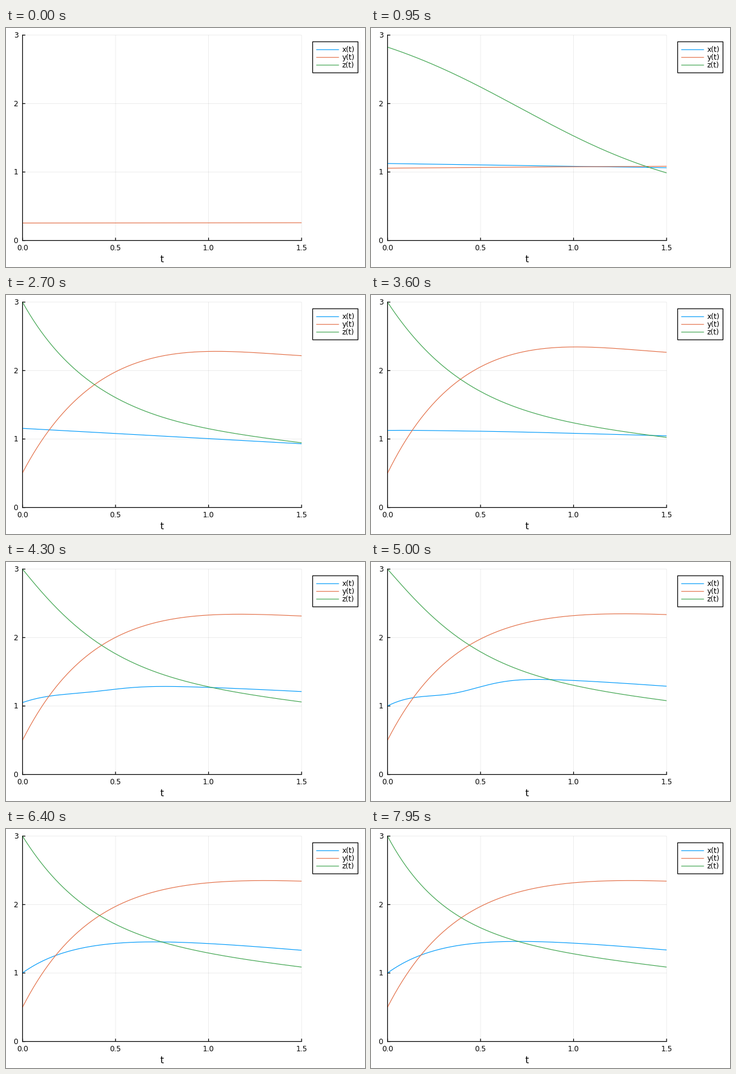
A matplotlib script for the animation above (8 s loop, 600 px wide and 400 px high).

```python
import numpy as np
import matplotlib.pyplot as plt
from matplotlib.animation import FuncAnimation
from matplotlib.patches import Rectangle

W, H, DPI = 600, 400, 100
LEFT, RIGHT, TOP, BOTTOM = 27.6, 494, 11.9, 355.6
FRAMES, INTERVAL = 160, 50
PX = 72 / DPI  # points per pixel
BLACK = "black"

plt.rcParams["font.family"] = "DejaVu Sans"
T = np.linspace(0, 1.5, 151)


# --- building blocks -------------------------------------------------------

def ease(s, a, b):
    u = np.clip((s - a) / (b - a), 0, 1)
    return u * u * (3 - 2 * u)


def fade(s, start, tau):
    """One until start, then a soft decay to zero."""
    return np.exp(-(max(s - start, 0) / tau) ** 1.3)


def bump(u, centre, width):
    return np.exp(-((u - centre) / width) ** 2)


def mix(a, b, w):
    return a + (b - a) * w


def relax(start, level, drift, rate):
    """Exponential approach from start to a drifting level."""
    return level + drift * T + (start - level) * np.exp(-rate * T)


def growth(s, first):
    return 1 - (1 - first) * np.exp(-s / 2.5)


# --- the three curves at training step s -----------------------------------

def x_curve(s):
    tilt = bump(s, 50, 20)
    line = 1.122 - 0.03 * T + (0.035 - 0.125 * T) * tilt
    solved = relax(1.0, 1.719, -0.25, 3.1)
    dip = 0.155 * bump(s, 100, 14) * bump(T, 0.34, 0.24)
    return growth(s, -0.15) * mix(solved, line, fade(s, 70, 20)) - dip


def y_curve(s):
    flat = growth(s, 0.24) * (1.061 + 0.012 * T)
    half = 0.871 + 0.836 * np.tanh((T - 0.25) / 0.65)
    bend = 0.085 * np.sin(2.8 * T) * fade(s, 72, 14)
    solved = relax(0.5, 2.712, -0.212, 2.5) + bend
    return mix(flat, mix(solved, half, fade(s, 36, 9)), ease(s, 18, 36))


def z_curve(s):
    slide = 1.932 - 1.395 * np.tanh((T - 0.72) / 0.95)
    early = growth(s, -0.15) * mix(1.2, slide, ease(s, 1, 18))
    tail = 0.24 * fade(s, 36, 30) * (1 - bump(T, 0, 0.6))
    lag = 2.1 * bump(s, 98, 31) * T * np.exp(-4 * T)
    solved = relax(3.0, 1.5235, -0.298, 3.3)
    return mix(early, solved - tail + lag, ease(s, 18, 36))


SERIES = [
    ("x(t)", "#009afa", x_curve),
    ("y(t)", "#e36f47", y_curve),
    ("z(t)", "#3ea44e", z_curve),
]

# --- fixed parts, in pixels from the top left ------------------------------

fig = plt.figure(figsize=(W / DPI, H / DPI), dpi=DPI, facecolor="white")
page = fig.add_axes([0, 0, 1, 1])
page.set(xlim=(0, W), ylim=(H, 0))
page.axis("off")


def rule(x0, y0, x1, y1, color=BLACK, width=1.25, alpha=1):
    page.plot([x0, x1], [y0, y1], color=color, alpha=alpha, linewidth=width * PX,
              solid_capstyle="butt", snap=False)


def label(x, y, text, ha="center", size=8.7):
    page.text(x, y, text, ha=ha, va="center", fontsize=size, color=BLACK)


def px(t):
    return LEFT + (RIGHT - LEFT) * t / 1.5


def py(v):
    return BOTTOM - (BOTTOM - TOP) * v / 3


for k in range(4):
    x, y = px(k / 2), py(k)
    rule(x, TOP, x, BOTTOM, width=0.7, alpha=0.1)
    rule(LEFT, y, RIGHT, y, width=0.7, alpha=0.1)
    rule(x, BOTTOM, x, BOTTOM - 4.7)
    rule(LEFT, y, LEFT + 4.7, y)
    label(x, 368, f"{k / 2:.1f}")
    label(20.3, y + 0.6, str(k), ha="right")
rule(LEFT, TOP - 0.6, LEFT, BOTTOM + 0.6)
rule(LEFT - 0.6, BOTTOM, RIGHT + 0.6, BOTTOM)
label(261, 387, "t", size=11.2)

page.add_patch(Rectangle((512.5, 23), 75.8, 52, facecolor="white", edgecolor=BLACK,
                         linewidth=1.25 * PX, snap=False))

# --- moving curves ---------------------------------------------------------

ax = fig.add_axes([LEFT / W, 1 - BOTTOM / H, (RIGHT - LEFT) / W, (BOTTOM - TOP) / H])
ax.set(xlim=(0, 1.5), ylim=(0, 3))
ax.axis("off")

lines = []
for i, (name, color, curve) in enumerate(SERIES):
    y = 36.3 + 12.9 * i
    rule(518.5, y, 556.5, y, color=color, width=1.15)
    label(562, y + 0.5, name, ha="left")
    lines += ax.plot([], [], color=color, linewidth=1.15 * PX, snap=False)


def draw(frame):
    for line, (_, _, curve) in zip(lines, SERIES):
        line.set_data(T, curve(frame))
    return lines


anim = FuncAnimation(fig, draw, frames=FRAMES, init_func=lambda: draw(0),
                     interval=INTERVAL, repeat=True, repeat_delay=0, blit=False)
plt.show()
```
